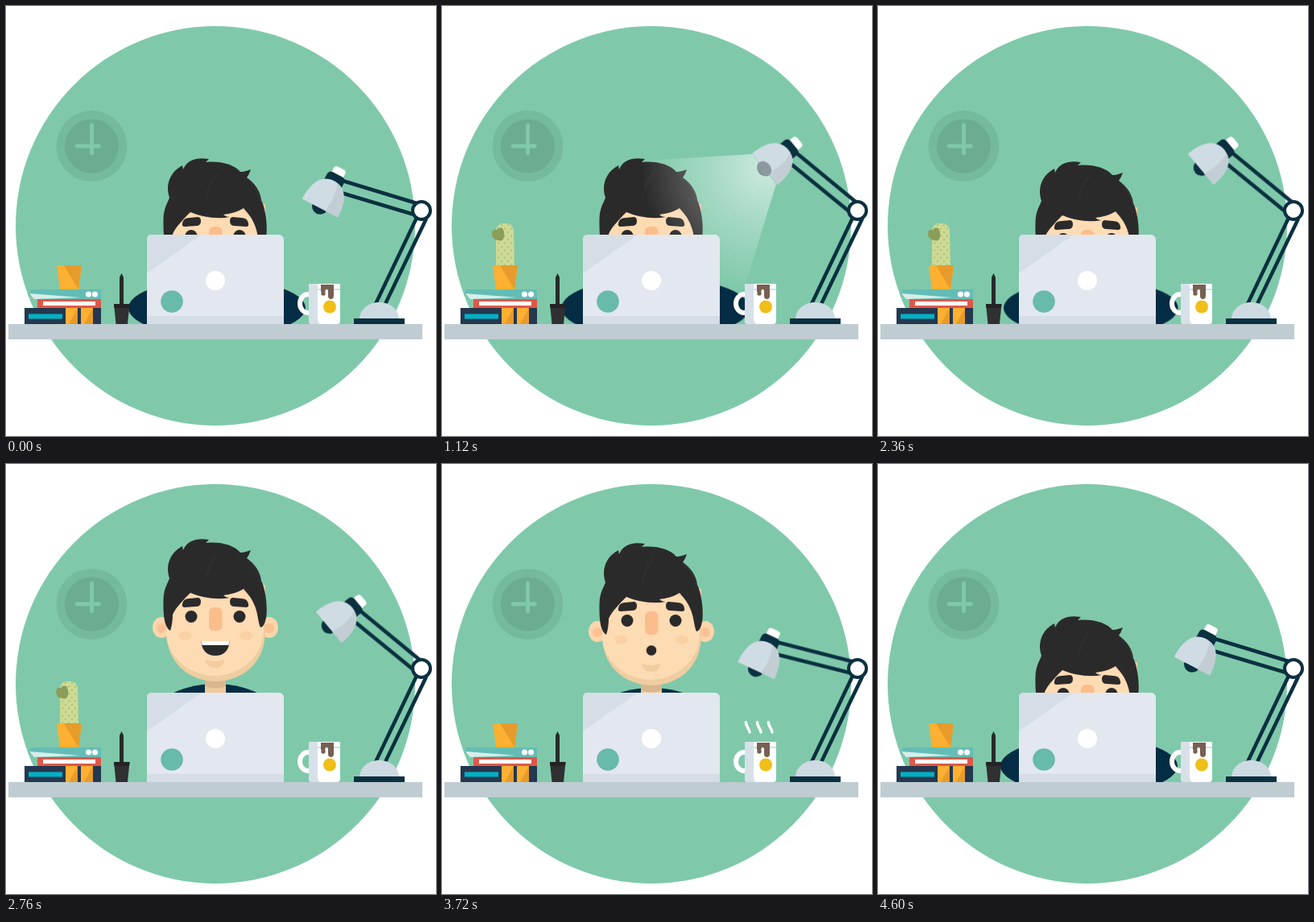
An HTML page without scripts that plays this animation: 534x534 px, repeating every 4640 ms.

```html
<!DOCTYPE html>
<html lang="en">
<head>
<meta charset="utf-8">
<title>Desk</title>
<style>
html, body { margin: 0; height: 100%; overflow: hidden; background: #fff; }
svg { display: block; width: 100vw; height: 100vh; }

.head, .body, .arm, .cactus, .light, .steam, .smile, .oh {
  animation: 4640ms ease-in-out infinite;
}
.head { animation-name: head; }
.body { animation-name: body; transform-origin: 262px 375px; }
.arm { animation-name: arm; transform-origin: 516px 254px; }
.cactus { animation-name: cactus; }
.light { animation-name: light; animation-timing-function: linear; }
.steam { animation-name: steam; animation-timing-function: linear; stroke-dasharray: 64 300; }
.smile { animation-name: smile; animation-timing-function: step-end; }
.oh { animation-name: oh; animation-timing-function: step-end; }

@keyframes head {
  0%, 49.2% { transform: translateY(96px); }
  51% { transform: translateY(100px); }
  56.9% { transform: translateY(-4px); }
  59.5% { transform: translateY(0); }
  61.5%, 63.8% { transform: translateY(5px); }
  67.7% { transform: translateY(-10px); }
  72.4%, 85.4% { transform: translateY(5px); }
  88.4% { transform: translateY(-9px); }
  94.4% { transform: translateY(99px); }
  98%, 100% { transform: translateY(96px); }
}
@keyframes body {
  0% { transform: scale(1); }
  9.5% { transform: translateX(2px) scale(1.03); }
  24%, 49.2% { transform: translateX(3px) scale(1.06); }
  54.5%, 89.5% { transform: scale(.7); }
  95%, 100% { transform: scale(1); }
}
@keyframes arm {
  0%, 2% { transform: rotate(0deg); }
  9.5% { transform: rotate(33deg); }
  14% { transform: rotate(20.5deg); }
  18%, 71.5% { transform: rotate(22.6deg); }
  75% { transform: rotate(33deg); }
  80.2% { transform: rotate(-2.5deg); }
  86%, 100% { transform: rotate(0deg); }
}
@keyframes cactus {
  0%, 2% { transform: translateY(56px); }
  9.5% { transform: translateY(-5px); }
  14%, 70% { transform: translateY(0); }
  73% { transform: translateY(-5px); }
  78.5%, 100% { transform: translateY(56px); }
}
@keyframes light {
  0%, 21% { opacity: 0; }
  22.5%, 32% { opacity: 1; }
  33.5%, 100% { opacity: 0; }
}
@keyframes steam {
  0%, 29.3% { stroke-dashoffset: 66; }
  44.8% { stroke-dashoffset: -102; }
  44.81%, 77.4% { stroke-dashoffset: 66; }
  92.9% { stroke-dashoffset: -102; }
  92.91%, 100% { stroke-dashoffset: -102; }
}
@keyframes smile { 0% { opacity: 1; } 66% { opacity: 0; } 96% { opacity: 1; } }
@keyframes oh { 0% { opacity: 0; } 66% { opacity: 1; } 96% { opacity: 0; } }
</style>
</head>
<body>
<svg viewBox="0 0 534 534" xmlns="http://www.w3.org/2000/svg">
  <defs>
    <clipPath id="aboveDesk"><path d="M0 0H534V395H0Z"/></clipPath>
    <clipPath id="abovePot"><path d="M40 200H110V323H40Z"/></clipPath>
    <clipPath id="faceShape"><path id="faceOutline" d="M199 150H322V209C322 246 294 270 260.500 270S199 246 199 209Z"/></clipPath>
    <radialGradient id="beam" gradientUnits="userSpaceOnUse" cx="402" cy="202" r="155">
      <stop offset="0" stop-color="#fff" stop-opacity=".6"/>
      <stop offset=".45" stop-color="#fff" stop-opacity=".3"/>
      <stop offset="1" stop-color="#fff" stop-opacity="0"/>
    </radialGradient>
    <pattern id="spots" width="8" height="9" patternUnits="userSpaceOnUse">
      <g fill="#b3c579"><circle cx="2" cy="2" r="1.300"/><circle cx="6" cy="6.500" r="1.300"/></g>
    </pattern>
    <path id="wisp" pathLength="100" d="M382 333C381 327 377 326 377.500 320S384 312 383 306S377 301 378 297S381 293 382 291"/>
  </defs>

  <circle cx="260" cy="273" r="248" fill="#7fc9aa"/>

  <!-- clock -->
  <circle cx="106.500" cy="174" r="44" fill="#75ba9c"/>
  <circle cx="106.500" cy="174" r="33.500" fill="#6cac90"/>
  <path d="M106.500 148V183M88 174H115.500" stroke="#7fc9aa" stroke-width="4.800" stroke-linecap="round"/>

  <!-- person -->
  <g clip-path="url(#aboveDesk)">
    <ellipse class="body" cx="262" cy="375" rx="110" ry="36" fill="#042c44"/>
    <g class="head">
      <ellipse cx="260" cy="325" rx="84" ry="52" fill="#042c44"/>
      <path d="M247 255H273V290H247Z" fill="#efc99d"/>
      <path d="M247 262H273V276Q260 281 247 276Z" fill="#d9b78e"/>
      <g fill="#fcd6ab">
        <ellipse cx="193" cy="203" rx="11" ry="13"/>
        <ellipse cx="327" cy="203" rx="11" ry="13"/>
      </g>
      <g fill="#fbc193"><circle cx="193" cy="204" r="6"/><circle cx="327" cy="204" r="6"/></g>
      <g clip-path="url(#faceShape)">
        <use href="#faceOutline" fill="#efcda0"/>
        <ellipse cx="259" cy="205" rx="61" ry="58" fill="#fddbb3"/>
      </g>
      <g fill="#fbd0a5">
        <ellipse cx="222.500" cy="213" rx="8" ry="5.500"/>
        <ellipse cx="298" cy="213" rx="8" ry="5.500"/>
      </g>
      <path d="M247 243Q260 247 271 243Q270 253 260 253T247 243Z" fill="#f3cc9f"/>
      <rect x="252" y="178" width="16.500" height="29" rx="6" fill="#fcbd8c"/>
      <g fill="#2b2a2b">
        <circle cx="230" cy="189.500" r="7.500"/>
        <circle cx="290" cy="189.500" r="7.500"/>
        <path d="M219 174Q220 167 228 167L239 166Q242 167 242 171Q242 177 236 177L222 178Q218 178 219 174Z"/>
        <path d="M301 174Q300 167 292 167L281 166Q278 167 278 171Q278 177 284 177L298 178Q302 178 301 174Z"/>
        <path d="M204 207C197 203 195 190 195.500 168C196 154 201 148 203 142C198 128 202 111 219 102L220 107C224 97 234 91 252 94L248 98C266 96 284 101 291 110C296 110 300 108 304 107Q302 113 299 117C309 124 316 134 317 145C323 157 325 180 323 191Q321 202 316 203C313 198 313 184 308 174C304 165 300 161 295 155C287 160 279 162 270 163Q273 166 278 166C262 169 243 166 229 160C221 168 211 178 207 187Q207 198 204 207Z"/>
        <g class="smile">
          <path d="M242.500 220H277.500C277 232 270 238 260 238S243 232 242.500 220Z"/>
          <path d="M242.500 220H277.500L276.500 225H243.500Z" fill="#fff"/>
        </g>
        <circle class="oh" cx="260" cy="226.500" r="6.300"/>
      </g>
      <path d="M262 112Q251 126 249 143M299 118Q312 128 316 146" fill="none" stroke="#333233" stroke-width="1.500"/>
    </g>
  </g>

  <path class="light" d="M385 184L250 192V395H362L415 221Z" fill="url(#beam)"/>

  <!-- laptop -->
  <rect x="175" y="284" width="170" height="117" rx="6" fill="#e3e7ef"/>
  <path d="M175 332V290Q175 284 181 284H243Z" fill="#d5dee7"/>
  <path d="M175 385H345V395H175Z" fill="#d6dde6"/>
  <circle cx="260" cy="341" r="12" fill="#fff"/>
  <circle cx="206" cy="367" r="13.800" fill="#68baa9"/>

  <!-- books -->
  <path d="M23 375H118V395H23Z" fill="#24384f"/>
  <path d="M28 382.500H70V388.500H28Z" fill="#00b1c4"/>
  <path d="M74 375H89V395H74ZM93 375H108V395H93Z" fill="#fdb031"/>
  <path d="M89 375V395H78ZM108 375V395H97Z" fill="#e69b2b"/>
  <path d="M39 364H118V375H39Z" fill="#dd594a"/>
  <path d="M46 367H111V372H46Z" fill="#fff"/>
  <path d="M30 352H118V364H39L28 359Z" fill="#64bdb5"/>
  <path d="M29 357L92 362L35 364Z" fill="#d9eeea"/>
  <g fill="#fff"><circle cx="102.500" cy="358" r="3.600"/><circle cx="110.500" cy="358" r="3.600"/></g>

  <!-- cactus -->
  <g clip-path="url(#abovePot)">
    <g class="cactus">
      <path id="stem" d="M67 340V281Q67 270 78 270T89 281L90 340Z" fill="#cdda95"/>
      <use href="#stem" style="fill:url(#spots)"/>
      <path d="M67 340V281Q67 270 78 270T89 281L90 340Z" fill="url(#spots)"/>
      <path d="M68 278Q71 274 75 276Q78 280 77 287Q75 293 70 291Q62 290 62 283Q62 277 68 278Z" fill="#8b9d58"/>
    </g>
  </g>
  <path d="M63 322H94L90 352H67Z" fill="#fdb031"/>
  <path d="M72 322H94L90 352Z" fill="#e69b2b"/>

  <!-- pen -->
  <path d="M141 372V337L143.500 332L146 337V372Z" fill="#29292b"/>
  <path d="M134 370H153.500L151 395H136.500Z" fill="#303033"/>
  <path d="M134 370H153.500L153 375H134.500Z" fill="#232325"/>

  <!-- mug -->
  <g fill="none" stroke="#fff" stroke-width="3.500" stroke-linecap="round">
    <use class="steam" href="#wisp"/>
    <use class="steam" href="#wisp" x="14"/>
    <use class="steam" href="#wisp" x="28"/>
  </g>
  <ellipse cx="375" cy="369.500" rx="10" ry="11.500" fill="none" stroke="#fff" stroke-width="6"/>
  <path d="M376 345H415V391Q415 395 411 395H380Q376 395 376 391Z" fill="#fff"/>
  <path d="M376 345H387V386Q387 395 391 395H380Q376 395 376 391Z" fill="#d7e0e8"/>
  <path d="M376 351H415V353H376Z" fill="#cfe3e2"/>
  <path d="M391 346H407V360Q407 364 403.500 364T400 360V353Q398 350 396.500 353V355H391Z" fill="#766052"/>
  <circle cx="394" cy="357" r="2.700" fill="#766052"/>
  <circle cx="402" cy="373.500" r="8" fill="#f0bf18"/>

  <path d="M3 395H517V414H3Z" fill="#bfccd2"/>

  <!-- lamp -->
  <g stroke="#0b3040" stroke-width="4.500" fill="none">
    <path d="M510 263L459 370M522 264L471 370"/>
    <g class="arm">
      <path d="M418 217L510 245M413 231L510 260"/>
      <g transform="translate(390 251) rotate(27.600)" stroke="none">
        <rect x="-8" y="-56" width="16" height="16" rx="4" fill="#fff"/>
        <rect x="-12" y="-47" width="24" height="18" rx="5" fill="#0b3040"/>
        <circle cx="-1" cy="-2" r="10" fill="#0b3040"/>
        <path d="M-25 0C-25 -25 -16 -38 0 -38S25 -25 25 0Z" fill="#cfdce4"/>
        <path d="M7 0C10 -14 9 -27 5 -37C18 -34 25 -20 25 0Z" fill="#c2cdd4"/>
        <ellipse class="light" cx="-1" cy="0" rx="10" ry="8" fill="#8b999f"/>
      </g>
    </g>
    <circle cx="516" cy="254" r="11" fill="#fff" stroke-width="4"/>
  </g>
  <path d="M439 389C440 361 487 361 488 389Z" fill="#cddae2"/>
  <path d="M432 388H495V395H432Z" fill="#0b3040"/>
</svg>
</body>
</html>
```
